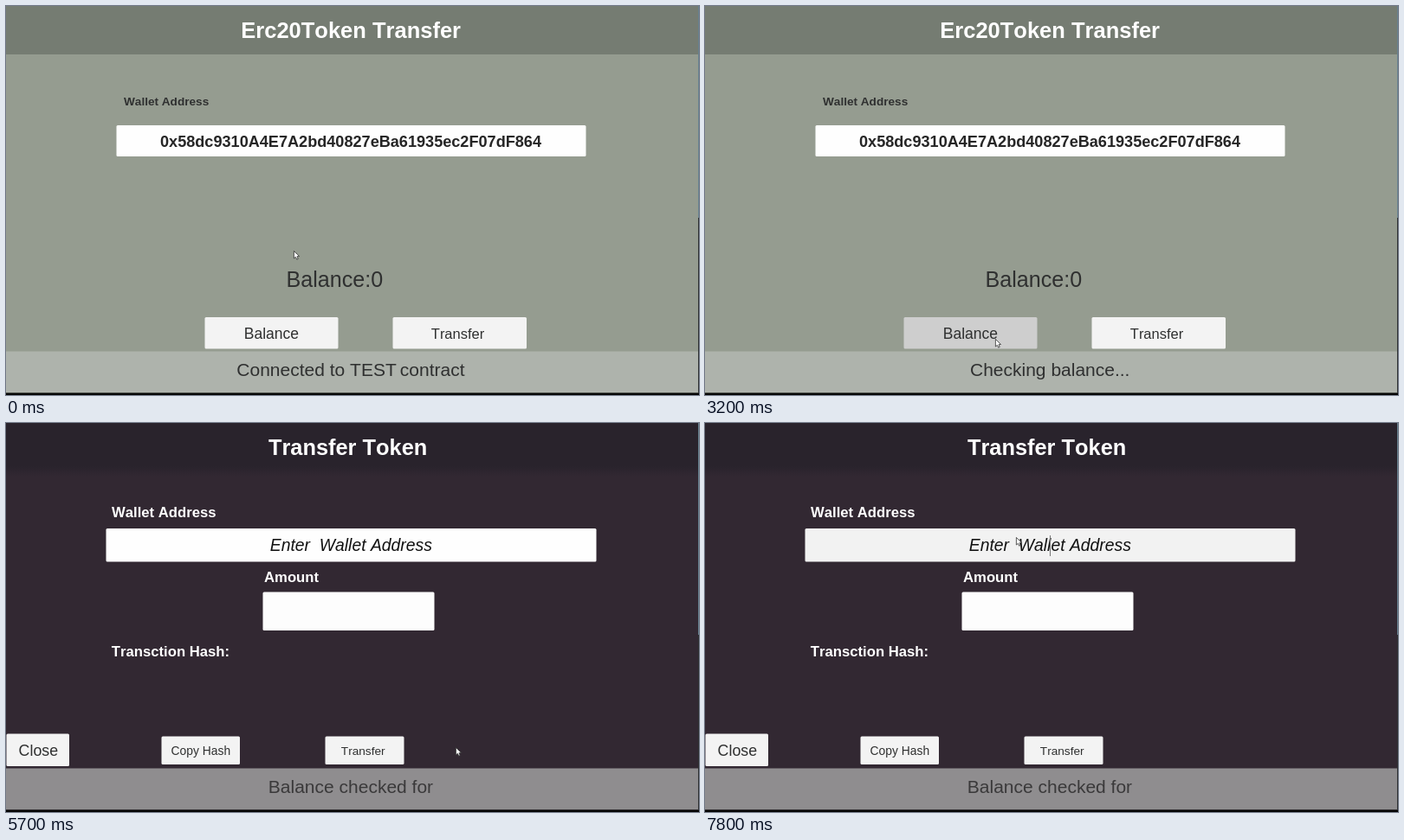
Recreate the animation shown at these times as an HTML page with a canvas. Size 800 by 450 pixels, loop 8000 ms.

```html
<!DOCTYPE html>
<html lang="en">
<head>
<meta charset="utf-8">
<title>Token Transfer</title>
<style>
  html, body { margin: 0; width: 100%; height: 100%; overflow: hidden; background: #000; }
  canvas { display: block; width: 800px; height: 450px; }
</style>
</head>
<body>
<canvas id="stage" width="800" height="450"></canvas>
<script>
const ctx = document.getElementById('stage').getContext('2d');
const LOOP = 8000, STEP = 100;
const FACE = '"Liberation Sans", Arial, sans-serif';
const WALLET = '0x58dc9310A4E7A2bd40827eBa61935ec2F07dF864';
const INK = '#2f3030';
const IDLE = 243, HOVER = 9, PRESS = 28;

const ramp = (t, from, to) => Math.min(1, Math.max(0, (t - from) / (to - from)));
const ease = p => p * p * (3 - 2 * p);

// Brightness change that takes two steps, the first one at the given time
const fade = (t, at, amount) => amount * ramp(t, at - STEP, at + STEP);

function pointerAt(t) {
  let x = 332, y = 283;
  const glide = (from, to, dx, dy) => {
    const e = ease(ramp(t, from, to));
    x += dx * e;
    y += dy * e;
  };
  glide(100, 1200, 4, 108);     // to Balance
  glide(1500, 1800, -1, -6);
  glide(4100, 4800, 184, -10);  // to Transfer
  glide(5900, 6800, -156, -298);
  glide(6800, 7200, -4, 55);    // into the address field
  return [Math.round(x), Math.round(y)];
}

function rect(x, y, w, h, fill) {
  ctx.fillStyle = fill;
  ctx.fillRect(x, y, w, h);
}

// Box with soft, half-covered edge pixels
function box(x, y, w, h, grey = IDLE) {
  ctx.beginPath();
  ctx.roundRect(x + 0.5, y + 0.5, w - 1, h - 1, 1.5);
  ctx.fillStyle = `rgb(${grey},${grey},${grey})`;
  ctx.fill();
}

function label(str, x, y, size, fill = INK, style = '') {
  ctx.font = `${style} ${size}px ${FACE}`;
  ctx.fillStyle = fill;
  ctx.fillText(str, x, y);
}

function edges() {
  rect(0, 447.5, 800, 2.5, '#050505');
  rect(799, 0, 1, 245, '#66818f');
  rect(799, 245, 1, 203, '#2c2f31');
}

function status(t, back, ink) {
  rect(0, 399.5, 800, 48, back);
  if (t < 3200) {
    label('Connected to TEST', 266.3, 428.3, 21, ink);
    label('contract', 454.8, 428.3, 21, ink);
  } else if (t < 3800) {
    label('Checking balance...', 306, 428.3, 21, ink);
  } else {
    label('Balance checked for', 302.8, 428.3, 21, ink);
  }
}

function mainPanel(t) {
  const balance = IDLE + fade(t, 900, -HOVER) + fade(t, 2600, -PRESS)
    + fade(t, 3300, PRESS) + fade(t, 4300, HOVER);
  const transfer = IDLE + fade(t, 4700, -HOVER) + fade(t, 5100, -PRESS * 1.6);

  rect(0, 0, 800, 450, '#959c90');
  rect(0, 0, 800, 56, '#757c72');
  label('Erc20Token Transfer', 271.3, 36.5, 25.5, '#fff', 'bold');
  label('Wallet Address', 136, 115.4, 13.6, INK, 'bold');
  box(127, 137.5, 543, 37, 254);
  label(WALLET, 178, 163.2, 18.12, '#262626', 'bold');
  if (t < 3800) label('Balance:0', 323.6, 325.4, 25.1);
  else label('9999321 TEST', 295.8, 325.2, 25);
  box(229, 359.5, 155, 37.5, balance);
  label('Balance', 274.8, 385.2, 17.5);
  box(446, 359.5, 155.5, 37.5, transfer);
  label('Transfer', 490.8, 384.6, 16.5);
  status(t, '#aeb3ac', INK);
}

function transferPanel(t) {
  const field = 254 + fade(t, 7000, -HOVER) + fade(t, 7500, -PRESS) + fade(t, 7700, PRESS - 3);
  const g = ctx.createLinearGradient(0, 50, 0, 62);
  g.addColorStop(0, '#29232c');
  g.addColorStop(1, '#322832');
  rect(0, 0, 800, 450, g);
  label('Transfer Token', 302.9, 36.5, 25.4, '#fff', 'bold');
  label('Wallet Address', 122, 109.4, 16.7, '#fff', 'bold');
  box(115, 121.5, 567, 39.5, field);
  label('Enter  Wallet Address', 304.8, 148.3, 19.35, '#111', 'italic');
  if (t >= 7800) rect(398, 130, 1, 24, '#777');
  label('Amount', 298, 184.4, 16.7, '#fff', 'bold');
  box(296, 195, 199, 45.5, 253);
  label('Transction Hash:', 121.8, 270.4, 16.7, '#fff', 'bold');
  box(0, 359, 73.5, 38.5);
  label('Close', 14.6, 385.2, 17.8);
  box(179, 362, 91.5, 33.5);
  label('Copy Hash', 190.6, 384, 13.85);
  box(368, 362, 92, 33.5);
  label('Transfer', 386.8, 384, 13.65);
  status(t, '#8f8d8f', '#3a393a');
}

function pointer(x, y) {
  const shape = [[0, 0], [0, 8.6], [2, 6.9], [3.3, 9.8], [4.8, 9.1], [3.6, 6.3], [6.2, 6.1]];
  ctx.beginPath();
  for (const [dx, dy] of shape) ctx.lineTo(x + 0.4 + dx, y + 0.4 + dy);
  ctx.closePath();
  ctx.fillStyle = '#fff';
  ctx.fill();
  ctx.strokeStyle = '#333';
  ctx.lineWidth = 0.8;
  ctx.stroke();
}

function draw(t) {
  ctx.fontKerning = 'none';
  if (t < 5700) mainPanel(t);
  else transferPanel(t);
  edges();
  pointer(...pointerAt(t));
}

const start = performance.now();
function tick() {
  const t = (performance.now() - start) % LOOP;
  draw(Math.floor(t / STEP) * STEP);
  requestAnimationFrame(tick);
}
tick();
</script>
</body>
</html>
```
